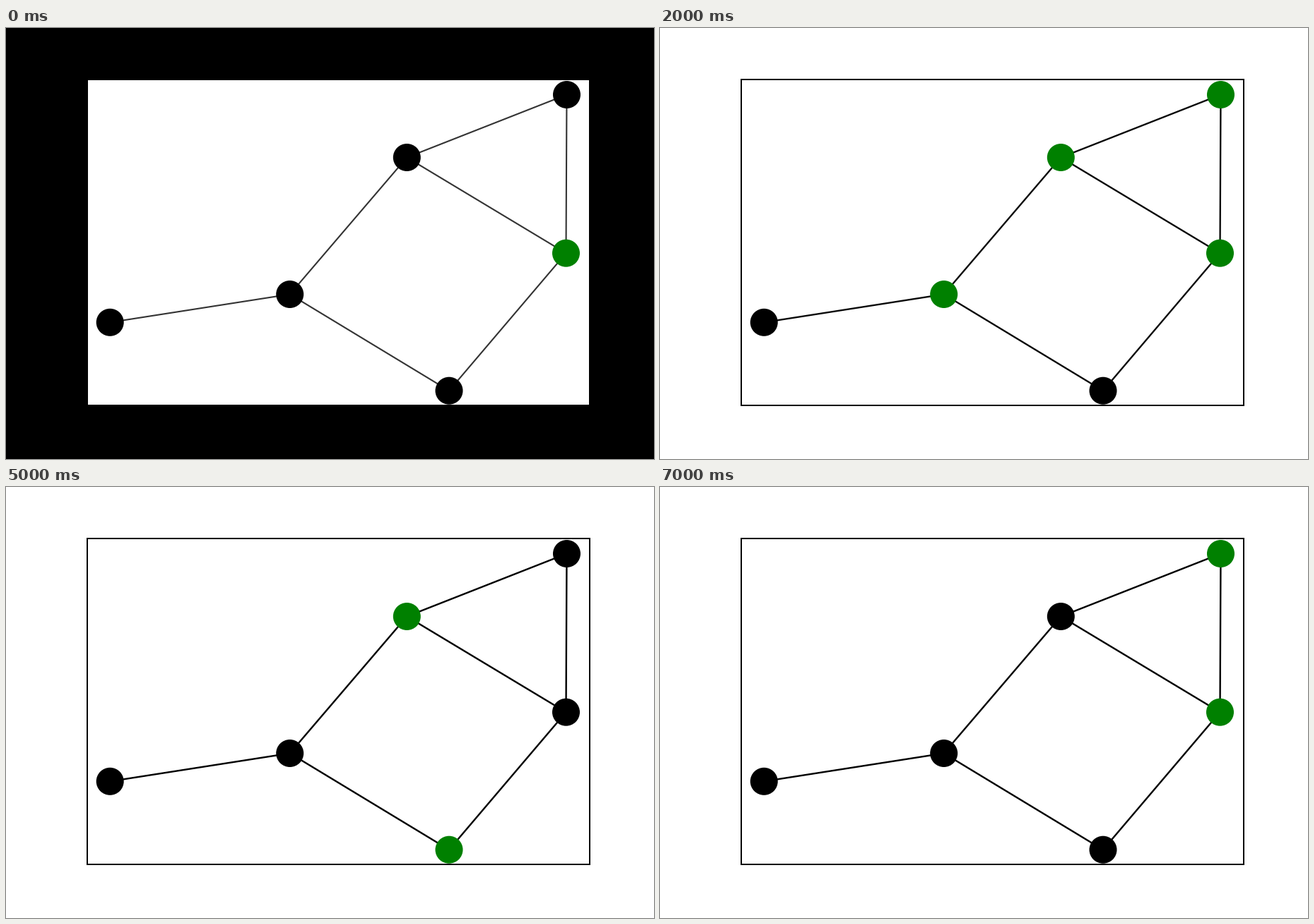
A matplotlib script for the animation above (8 s loop, 917 by 611 pixels).

```python
import matplotlib.pyplot as plt
from matplotlib.animation import FuncAnimation
from matplotlib.patches import Circle, Rectangle

W, H, DPI = 917, 611, 64
PT = 72 / DPI  # points per pixel
BLACK, GREEN = "#000000", "#008000"
RADIUS = 19.5

NODES = {
    "A": (147.2, 417.3),
    "B": (401.7, 377.5),
    "C": (567.3, 183.5),
    "D": (793.5, 94.5),
    "E": (792.5, 319.2),
    "F": (627.0, 514.2),
}
EDGES = ["AB", "BC", "BF", "CD", "CE", "DE", "EF"]

# Lit nodes at each step: a spread from E, then one from B
STEPS = ["E", "CDF", "BCDE", "BCDEF", "B", "CF", "BDE", "DE"]

# Edges get darker and slightly wider over the first steps: (grey, width)
INK = [("0.2", 2.1), ("0.1", 2.25), ("0.03", 2.35), ("0", 2.4)]

fig = plt.figure(figsize=(W / DPI, H / DPI), dpi=DPI)
ax = fig.add_axes([0, 0, 1, 1])
ax.set_xlim(0, W)
ax.set_ylim(H, 0)
ax.axis("off")


def box(x0, y0, x1, y1, color):
    return ax.add_patch(Rectangle((x0, y0), x1 - x0, y1 - y0, fc=color,
                                  lw=0, antialiased=False))


backdrop = box(0, 0, W, H, BLACK)
box(114, 72, 827, 536, BLACK)
box(116, 74, 825, 534, "white")

lines = []
for a, b in EDGES:
    (x0, y0), (x1, y1) = NODES[a], NODES[b]
    lines += ax.plot([x0, x1], [y0, y1], zorder=2, snap=False)

dots = {name: ax.add_patch(Circle(pos, RADIUS, lw=0, zorder=3))
        for name, pos in NODES.items()}


def draw(step):
    backdrop.set_facecolor(BLACK if step == 0 else "white")
    grey, width = INK[min(step, len(INK) - 1)]
    for line in lines:
        line.set_color(grey)
        line.set_linewidth(width * PT)
    for name, dot in dots.items():
        dot.set_facecolor(GREEN if name in STEPS[step] else BLACK)
    return [backdrop, *lines, *dots.values()]


anim = FuncAnimation(fig, draw, frames=len(STEPS), interval=1000,
                     repeat=True, repeat_delay=0, blit=False)
plt.show()
```
